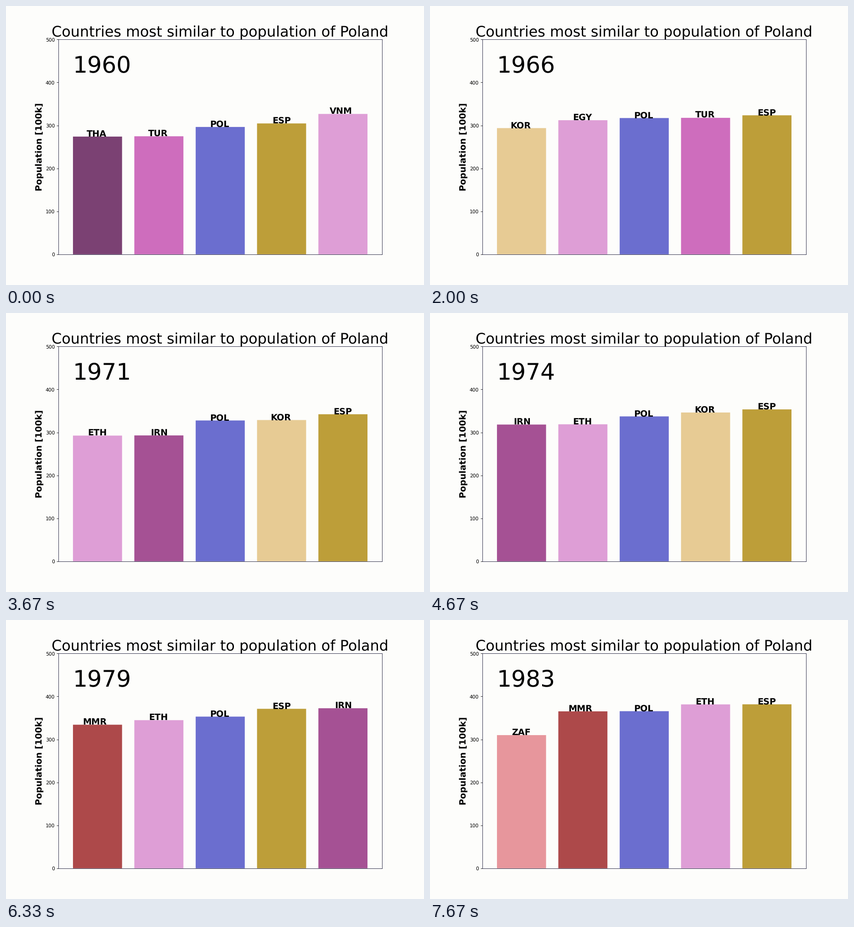
Animation, 917 px wide and 611 px high, one loop 8000 ms. Source, as a matplotlib script:

```python
import numpy as np
import matplotlib.pyplot as plt
from matplotlib.animation import FuncAnimation

plt.rcParams["text.hinting"] = "none"

DPI = 611 / 8
LOOP, INTERVAL = 8000, 40
FIRST_YEAR, YEARS = 1960, 24
HOME = "POL"
BACKGROUND = "#fdfdfb"
FRAME = "#101030"


def growth(start, rate):
    """Population growing by a fixed share each year."""
    return lambda t: start * (1 + rate) ** t


def track(*points):
    """Population running straight between (year, value) key points."""
    return lambda t: np.interp(t, *zip(*points))


# Population in 100k by years since 1960.
COUNTRIES = {
    "POL": ("#6b6ecf", track((0, 296.4), (4, 311.4), (8, 322.9), (11, 327.8), (23, 365.7))),
    "ESP": ("#bd9e39", track((0, 304.6), (4, 316), (18, 368.6), (23, 381.7))),
    "TUR": ("#ce6dbd", growth(274.7, 0.0245)),
    "THA": ("#7b4173", growth(274.0, 0.0303)),
    "VNM": ("#de9ed6", growth(326.7, 0.03)),
    "EGY": ("#de9ed6", growth(266.3, 0.0268)),
    "KOR": ("#e7cb94", track((0, 250.1), (8, 308.3), (11, 328.8), (23, 399))),
    "IRN": ("#a55194", track((0, 209.4), (11, 293), (14, 318.3), (23, 415.9))),
    "ETH": ("#de9ed6", track((0, 193.6), (12, 301.6), (14, 318.9), (19, 344.8), (23, 381.5))),
    "MMR": ("#ad494a", track((0, 186.5), (23, 365.3))),
    "ZAF": ("#e7969c", track((0, 123.7), (23, 310))),
}


def neighbours(t):
    """The home country with the two nearest below it and the two above."""
    ranked = sorted((population(t), code, color) for code, (color, population) in COUNTRIES.items())
    home = [code for _, code, _ in ranked].index(HOME)
    return ranked[home - 2:home + 3]


# The tiny margin keeps the pixel width from rounding down.
fig, ax = plt.subplots(figsize=(917 / DPI + 1e-9, 8), dpi=DPI, facecolor=BACKGROUND)
ax.set_facecolor(BACKGROUND)
ax.set_xlim(-0.64, 4.64)
ax.set_ylim(0, 500)
ax.set_xticks([])
ax.spines[:].set_color(FRAME)
ax.set_title("Countries most similar to population of Poland", fontsize=30)
ax.set_ylabel("Population [100k]", fontsize=18, fontweight="bold")

bars = ax.bar(range(5), [0] * 5, width=0.8, snap=False)
labels = [ax.text(i + 0.15, 0, "", ha="right", fontsize=18, fontweight="bold") for i in range(5)]
year_text = ax.text(-0.4, 424, "", fontsize=47.5)


def update(frame):
    # Each year starts on the last tick that is not late.
    t = int((frame * INTERVAL + 30) * YEARS / LOOP)
    year_text.set_text(str(FIRST_YEAR + t))
    for bar, label, (value, code, color) in zip(bars, labels, neighbours(t)):
        bar.set_height(value)
        bar.set_facecolor(color)
        label.set_text(code)
        label.set_y(value)
    return [*bars, *labels, year_text]


anim = FuncAnimation(fig, update, frames=LOOP // INTERVAL, interval=INTERVAL,
                     init_func=lambda: update(0), repeat=True, repeat_delay=0)
plt.show()
```
